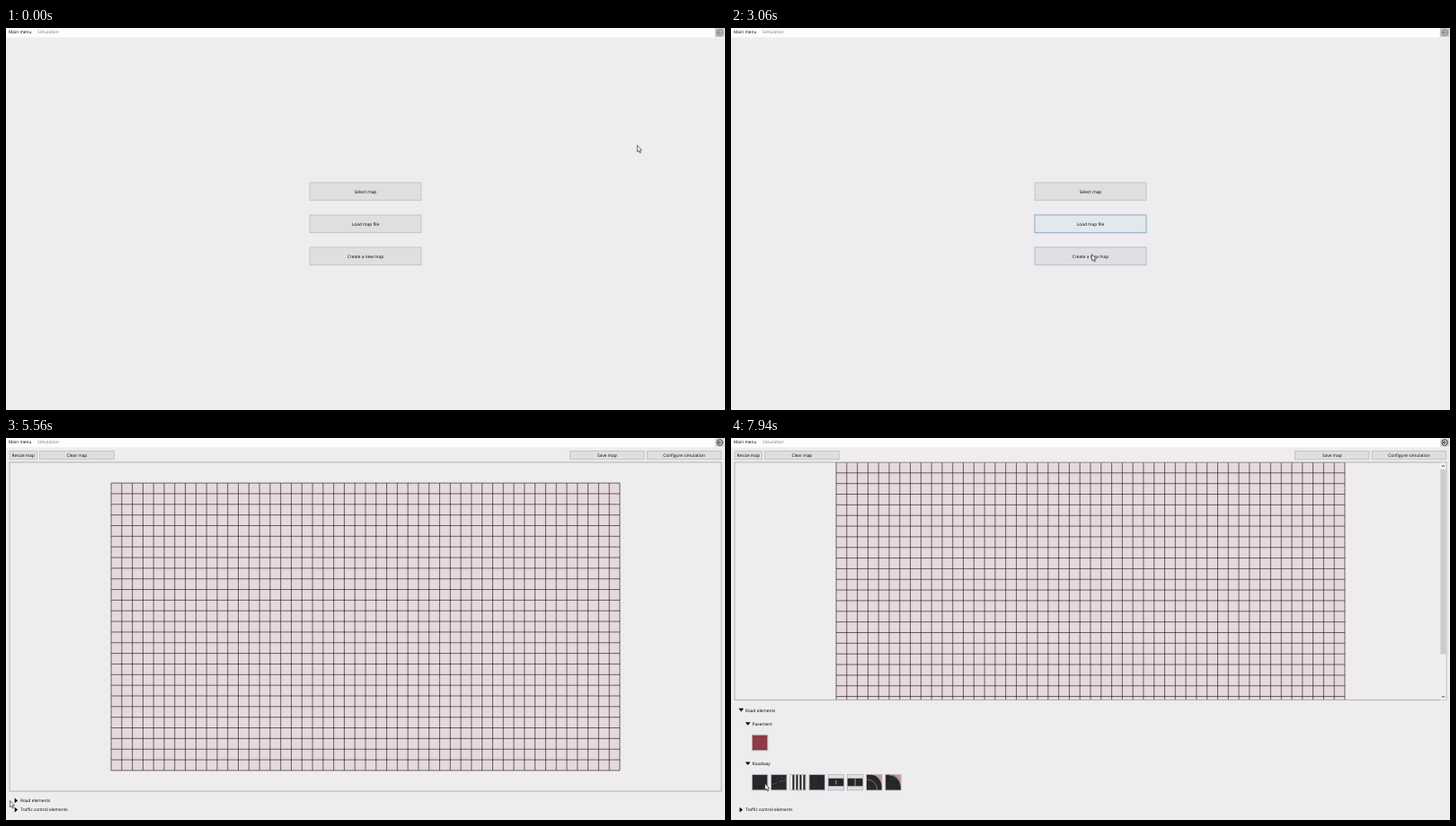
These frames come from a looping animation (800 by 425 pixels, 8000 ms). An HTML page:

```html
<!DOCTYPE html>
<html lang="en">
<head>
<meta charset="utf-8">
<title>Map editor</title>
<style>
html, body { margin: 0; width: 100%; height: 100%; overflow: hidden; background: #eeecef; }
svg { display: block; width: 800px; height: 425px; }
text { font: 4.8px "Open Sans", "Noto Sans", sans-serif; fill: #000; text-rendering: geometricPrecision; }
</style>
</head>
<body>
<svg id="stage" viewBox="0 0 800 425"></svg>
<script>
const LOOP = 8000, COLS = 48, ROWS = 27, ASPECT = 1.0045;
const stage = document.getElementById('stage');

function set(el, attrs) {
  for (const k in attrs) el.setAttribute(k, attrs[k]);
  return el;
}
function add(parent, tag, attrs) {
  return parent.appendChild(set(document.createElementNS('http://www.w3.org/2000/svg', tag), attrs || {}));
}
const group = (parent, attrs) => add(parent, 'g', attrs);
const rect = (parent, x, y, width, height, fill, more) =>
  add(parent, 'rect', { x, y, width, height, fill, ...more });
const path = (parent, d, more) => add(parent, 'path', { d, fill: 'none', ...more });
const show = (el, on) => el.setAttribute('visibility', on ? 'inherit' : 'hidden');

function label(parent, str, x, y, more) {
  const el = add(parent, 'text', { x, y: y + 1.7, ...more });
  el.textContent = str;
  return el;
}
function button(parent, str, x, y, w, h) {
  rect(parent, x, y, w, h, '#dfdee0', { stroke: '#b7b6b9', 'stroke-width': 0.7 });
  const glow = rect(parent, x, y, w, h, '#e5eef5', { stroke: '#5796bd', 'stroke-width': 0.8, opacity: 0 });
  label(parent, str, x + w / 2, y + h / 2 + 0.2, { 'text-anchor': 'middle' });
  return glow;
}

// Menu bar
rect(stage, 0, 0, 800, 10.3, '#fdfdfd');
label(stage, 'Main menu', 3, 4.6);
label(stage, 'Simulation', 35, 4.6, { style: 'fill:#777' });
const backBox = rect(stage, 788.8, 0, 10.7, 10, '#c8c7c9');
const back = path(stage, 'M797.5 5a3.3 3.3 0 1 1-6.6 0a3.3 3.3 0 1 1 6.6 0M796.3 5H792.5M794.2 3.2L792.4 5L794.2 6.8',
  { 'stroke-width': 0.8 });

// Start page
const home = group(stage);
const glows = ['Select map', 'Load map file', 'Create a new map']
  .map((str, i) => button(home, str, 338, 172 + i * 36, 124, 19.8));
const hovers = [
  [[1430, 2400]],
  [[1270, 1390], [2470, 2990]],
  [[960, 1200], [3020, 3500]]
];
function hoverLevel(spans, t) {
  return Math.max(...spans.map(([a, b]) =>
    t < a ? 0 : t < b ? Math.min(1, (t - a) / 250) : Math.max(0, 1 - (t - b) / 200)));
}

// Editor page
const editor = group(stage);
[['Resize map', 4, 30.5], ['Clear map', 37.5, 82.7], ['Save map', 627.5, 82.5], ['Configure simulation', 713.3, 82.5]]
  .forEach(([str, x, w]) => button(editor, str, x, 14.6, w, 9.2));
const clip = add(add(editor, 'clipPath', { id: 'view' }), 'rect', { x: 4, y: 27 });
const map = group(editor, { 'clip-path': 'url(#view)' });
const ground = rect(map, 0, 0, 0, 0, '#e6d9dc');
const lines = path(map, '', { stroke: '#0c0708' });
const frame = rect(editor, 4, 27, 792, 0, 'none', { stroke: '#a9a8ab', 'stroke-width': 0.9 });

function scrollbar() {
  const g = group(editor);
  return {
    g,
    track: rect(g, 0, 0, 0, 0, '#f1f0f1'),
    thumb: rect(g, 0, 0, 0, 0, '#cdcccd'),
    arrows: path(g, '', { stroke: '#333', 'stroke-width': 1 })
  };
}
const vbar = scrollbar(), hbar = scrollbar();

function drawMap(cell, open) {
  const rowH = cell * ASPECT, w = cell * COLS, h = rowH * ROWS;
  const full = open ? 264.5 : 366, wide = w > 792;
  const viewH = full - (wide ? 7 : 0), bottom = 27 + viewH;
  const tall = h > viewH, viewW = tall ? 785 : 792;
  const left = (wide ? 396.5 : 400) - w / 2;
  const top = !tall ? 210 - h / 2 : open ? 27 : bottom - h;
  set(clip, { width: viewW, height: viewH });
  set(frame, { height: full });
  set(ground, { x: left, y: top, width: w, height: h });
  let d = '';
  for (let i = 0; i <= COLS; i++) d += `M${left + i * cell} ${top}v${h}`;
  for (let i = 0; i <= ROWS; i++) d += `M${left} ${top + i * rowH}h${w}`;
  set(lines, { d, 'stroke-width': cell * 0.05 });

  show(vbar.g, tall);
  show(hbar.g, wide);
  const len = viewH - 16, size = len * viewH / h;
  set(vbar.track, { x: 789, y: 27.5, width: 6.6, height: viewH - 0.5 });
  set(vbar.thumb, { x: 789.3, y: 35 + (27 - top) / h * len, width: 6.3, height: size });
  set(vbar.arrows, { d: `M790.8 32l1.6-1.6l1.6 1.6M790.8 ${bottom - 4.4}l1.6 1.6l1.6-1.6` });
  set(hbar.track, { x: 4.5, y: 386, width: 791, height: 6.6 });
  set(hbar.thumb, { x: 19, y: 386.5, width: 755, height: 6 });
  set(hbar.arrows, { d: 'M8.8 387.8l-1.6 1.6l1.6 1.6M784.6 387.8l1.6 1.6l-1.6 1.6' });
}

function expander(parent, str, x) {
  const g = group(parent);
  const arrow = path(g, '', { fill: '#000' });
  label(g, str, x + 7, 0);
  return (y, open) => {
    set(g, { transform: `translate(0 ${y})` });
    set(arrow, { d: open ? `M${x - 0.5} -2h5.6l-2.8 3.6z` : `M${x + 0.6} -2.9v5.6l3.4-2.8z` });
  };
}
const road = expander(editor, 'Road elements', 9);
expander(editor, 'Traffic control elements', 9)(413.7, false);
const parts = group(editor);
const pavement = expander(parts, 'Pavement', 16.5);
const roadway = expander(parts, 'Roadway', 16.5);

function tile(parent, i, fill) {
  const g = group(parent, { transform: `translate(${23.4 + i * 21.2} 0)` });
  rect(g, 0, 0, 17.4, 17.4, fill, { stroke: '#b9b8bb', 'stroke-width': 0.9 });
  return g;
}
function specks(g, n, seed) {
  for (let i = 0; i < n; i++) {
    seed = (seed * 137 + 71) % 997;
    rect(g, 1 + seed % 15, 1 + (seed * 7 % 150) / 10, 0.7, 0.6, '#66656a');
  }
}
const ASPHALT = '#262629';
const paving = group(parts, { transform: 'translate(0 330.3)' });
tile(paving, 0, '#8d3b48');
const tiles = group(parts, { transform: 'translate(0 374.4)' });
const paint = { stroke: '#c4c3c5', 'stroke-width': 0.5 };
specks(tile(tiles, 0, ASPHALT), 8, 17);
const rough = tile(tiles, 1, ASPHALT);
specks(rough, 24, 53);
path(rough, 'M1 11L6 10M9 8L16 6', { stroke: '#77767a', 'stroke-width': 0.4 });
const zebra = tile(tiles, 2, '#f2f2f2');
for (let i = 0; i < 4; i++) rect(zebra, 2.6 + i * 4, 0.4, 2.1, 16.6, '#202022');
specks(tile(tiles, 3, ASPHALT), 12, 91);
[4, 5].forEach(i => {
  const g = tile(tiles, i, '#dfdee1');
  rect(g, 0.3, 4.3, 16.8, 8.6, ASPHALT);
  path(g, i === 4 ? 'M8.7 6.4v4.6' : 'M8.7 4.3v8.6', { ...paint, 'stroke-width': 0.8 });
});
[6, 7].forEach(i => {
  const g = tile(tiles, i, '#c9969e');
  path(g, 'M0.4 0.4H5A12.2 13 0 0 1 17 14V17H0.4Z', { fill: ASPHALT });
  specks(g, 7, 30 + i);
  path(g, i === 6 ? 'M0.5 5.5A11 11 0 0 1 12 17' : 'M4 0.6A13 13 0 0 1 17 13', paint);
});

// Pointer: time, x, y of the tip
const moves = [
  [0, 702.4, 130.6], [190, 702.4, 130.6], [520, 560, 245], [760, 442, 297], [1000, 408, 262],
  [1200, 406, 243], [1330, 407, 217], [1500, 409.4, 181], [2250, 409.4, 181], [2540, 405, 216],
  [2900, 402, 222], [3050, 401.4, 251.6], [3380, 400.6, 254.8], [4800, 400.6, 254.8], [5380, 40, 408],
  [5560, 4.4, 403.5], [5800, 10, 402.5], [6000, 10, 402.5], [6400, 17.5, 336], [6670, 17.5, 336],
  [6750, 19.8, 352.6], [7020, 18.5, 379], [7280, 18.5, 379], [7600, 26, 376], [7900, 37.8, 384.5], [8000, 37.8, 384.5]
];
const pointer = path(stage, 'M0 0V7.2L1.7 5.8L2.8 8.4L4 7.9L2.9 5.4H5Z',
  { fill: '#fff', stroke: '#222', 'stroke-width': 0.65 });
function pointerAt(t) {
  const i = moves.findIndex(m => m[0] > t);
  const [t0, x0, y0] = moves[i - 1], [t1, x1, y1] = moves[i];
  const u = (t - t0) / (t1 - t0), e = u * u * (3 - 2 * u);
  return [x0 + (x1 - x0) * e, y0 + (y1 - y0) * e];
}

const zooms = [[0, 16.667], [4100, 14.85], [4310, 13.23], [4520, 11.79]];
let lastView = '';

function render(t) {
  const editing = t >= 3500, open = t >= 5980;
  const paved = t >= 6800, roads = t >= 7310;
  show(home, !editing);
  show(editor, editing);
  set(backBox, { fill: editing ? '#dbdadc' : '#c8c7c9' });
  set(back, { stroke: editing ? '#151515' : '#666' });
  glows.forEach((g, i) => set(g, { opacity: hoverLevel(hovers[i], t) }));

  const cell = zooms.filter(z => z[0] <= t).pop()[1];
  const view = cell + '/' + open;
  if (view !== lastView) drawMap(cell, open);
  lastView = view;

  road(open ? 302.8 : 403.5, open);
  show(parts, editing && open);
  pavement(paved ? 318.2 : 337, t >= 6720);
  roadway(roads ? 362.5 : paved ? 380 : 376.3, roads);
  show(paving, editing && paved);
  show(tiles, editing && roads);

  const [x, y] = pointerAt(t);
  set(pointer, { transform: `translate(${x} ${y})` });
}
const start = performance.now();
function tick() {
  render((performance.now() - start) % LOOP);
  requestAnimationFrame(tick);
}
tick();
</script>
</body>
</html>
```
